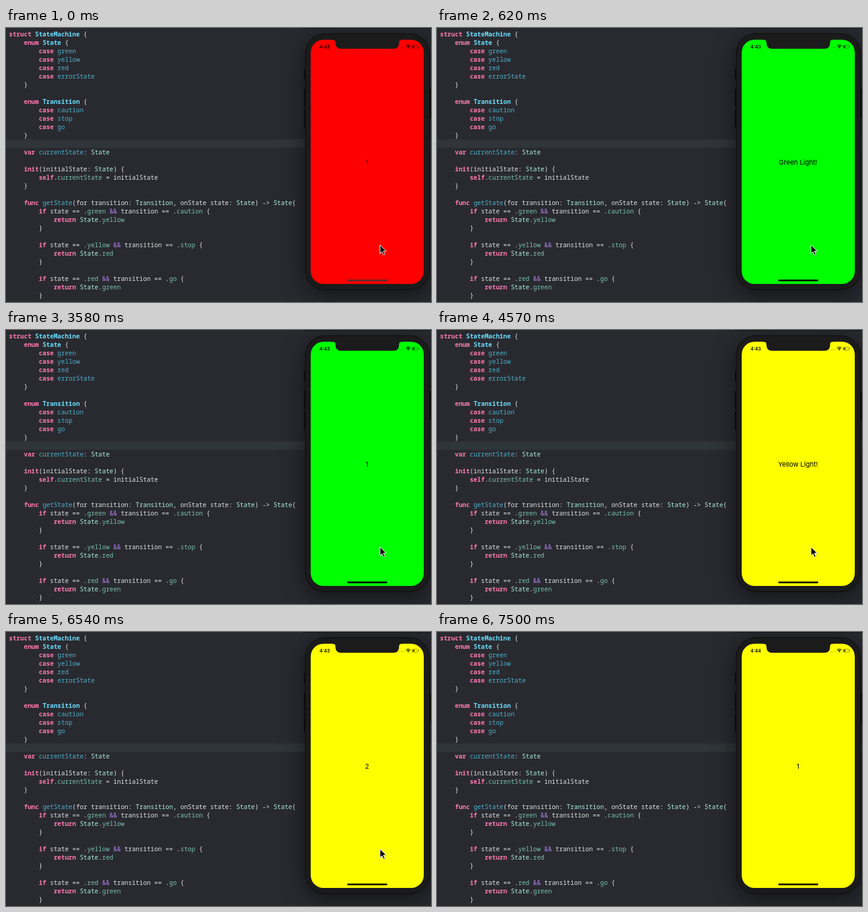
Recreate the animation shown at these times as an HTML page. Size 705 by 455 pixels, loop 8 s.

```html
<!DOCTYPE html>
<html lang="en">
<head>
<meta charset="utf-8">
<title>Traffic light state machine</title>
<style>
html, body { margin: 0; width: 100%; height: 100%; overflow: hidden; background: #292a30; }
#stage { position: relative; width: 705px; height: 455px; overflow: hidden; background: #292a30; }
#stage > * { position: absolute; }
#line { left: 0; top: 185px; width: 705px; height: 14px; background: #2f3539; }
#code { left: 5px; top: 3px; margin: 0; color: #e3e3e4; font: 500 10.3px/14px "Noto Sans Mono", "DejaVu Sans Mono", monospace; }
.key { color: #ff7ab2; font-weight: 700; }
.type { color: #6bdfff; font-weight: 600; }
.decl { color: #4eb0cc; }
.use { color: #acf2e4; }
.prop { color: #78c2b3; }
.op { color: #b281eb; }
#top { left: 493px; top: 0; width: 212px; height: 1px; background: #111214; }
#phone { left: 496px; top: 9px; width: 207px; height: 426px; box-sizing: border-box; border: 1px solid #0c0c0d; border-radius: 33px; background: #1b1b1c; box-shadow: 0 8px 36px rgba(0, 0, 0, .55); }
.button { width: 2px; background: #111113; }
svg { left: 0; top: 0; }
text { font-family: Inter, Roboto, sans-serif; }
</style>
</head>
<body>
<div id="stage">
  <div id="line"></div>
  <pre id="code"></pre>
  <div id="top"></div>
  <div class="button" style="left:494px;top:68px;height:17px"></div>
  <div class="button" style="left:494px;top:101px;height:30px"></div>
  <div class="button" style="left:494px;top:135px;height:30px"></div>
  <div class="button" style="left:703px;top:101px;height:49px"></div>
  <div id="phone"></div>
  <svg width="705" height="455" viewBox="0 0 705 455">
    <rect id="screen" x="505.5" y="19.5" width="187.5" height="405.5" rx="21"/>
    <path fill="#1b1b1c" d="M541 19H657V19.6Q652 19.6 652 24V25Q652 34.5 642.500 34.5H556Q546.500 34.5 546.500 25V24Q546.500 19.600 541 19.600Z"/>
    <text id="clock" x="520" y="33.500" font-size="7.500" font-weight="600"></text>
    <path d="M652.500 32.500H661" stroke="#000" stroke-opacity=".35" stroke-dasharray="1.300 1.100"/>
    <g fill="none" stroke="#000" stroke-width="1.200">
      <path d="M663.600 29.800Q667.200 26.700 670.800 29.800M665.100 31.500Q667.200 29.800 669.300 31.500"/>
      <path d="M666.200 32.600L667.200 33.700L668.200 32.600Z" fill="#000" stroke-width=".4"/>
    </g>
    <rect x="673.500" y="28.500" width="10" height="5" rx="1.500" fill="none" stroke="#000" stroke-opacity=".45" stroke-width=".8"/>
    <rect x="674.500" y="29.500" width="3" height="3" rx=".6" fill-opacity=".8"/>
    <path d="M684.800 30V32" stroke="#000" stroke-opacity=".45"/>
    <text id="label" x="598.800" y="226.500" font-size="11" text-anchor="middle"></text>
    <rect id="home" x="566" y="417.800" width="66.500" height="2.600" rx="1.300"/>
    <g id="cursor">
      <path d="M.4 .4V14.600L3.700 11.500L6.100 17L8.500 16L6.100 10.600H10.700Z" transform="translate(.3 .8)" fill-opacity=".25" stroke="#000" stroke-opacity=".15"/>
      <path d="M.4 .4V14.600L3.700 11.500L6.100 17L8.500 16L6.100 10.600H10.700Z" stroke="#fff" stroke-width="1"/>
    </g>
  </svg>
</div>
<script>
const $ = id => document.getElementById(id);

const source = `struct StateMachine {
    enum State {
        case green
        case yellow
        case red
        case errorState
    }

    enum Transition {
        case caution
        case stop
        case go
    }

    var currentState: State

    init(initialState: State) {
        self.currentState = initialState
    }

    func getState(for transition: Transition, onState state: State) -> State{
        if state == .green && transition == .caution {
            return State.yellow
        }

        if state == .yellow && transition == .stop {
            return State.red
        }

        if state == .red && transition == .go {
            return State.green
        }`;

// Earlier rules win.
const rules = {
  key: /\b(?:struct|enum|case|var|init|self|func|if|return)\b/,
  type: /(?<=(?:struct|enum) )\w+/,
  decl: /(?<=(?:case|var|func) )\w+/,
  prop: /(?<=\.)\w+/,
  use: /\b(?:State|Transition)\b/,
  op: /&&/
};
const syntax = new RegExp(
  Object.entries(rules).map(([name, re]) => `(?<${name}>${re.source})`).join("|"), "g");

let last = 0;
for (const m of source.matchAll(syntax)) {
  const span = document.createElement("span");
  span.className = Object.keys(rules).find(name => m.groups[name]);
  span.textContent = m[0];
  $("code").append(source.slice(last, m.index), span);
  last = m.index + m[0].length;
}
$("code").append(source.slice(last));

const LOOP = 8000;
const RED = "#ff0000", GREEN = "#00ff00", YELLOW = "#ffff00";
const steps = [
  [0, RED, "1"],
  [620, GREEN, "Green Light!"],
  [1610, GREEN, "3"],
  [2590, GREEN, "2"],
  [3580, GREEN, "1"],
  [4570, YELLOW, "Yellow Light!"],
  [5560, YELLOW, "3"],
  [6540, YELLOW, "2"],
  [7500, YELLOW, "1"]
];

const exit = { start: 6900, end: 7500, moves: 7 };

function cursorAt(t) {
  if (t < exit.start) return [620, 360];
  const k = Math.floor((t - exit.start) / (exit.end - exit.start) * exit.moves) + 1;
  const p = Math.min(1, k / exit.moves) ** 1.5;
  return [620 + 38 * p, 360 + 100 * p];
}

function draw(now) {
  const t = now % LOOP;
  const [, color, label] = steps.findLast(s => t >= s[0]);
  const red = color === RED;
  $("screen").setAttribute("fill", color);
  $("label").textContent = label;
  $("label").setAttribute("fill", red ? "#480000" : "#000");
  $("home").setAttribute("fill", red ? "#552c2c" : "#000");
  $("clock").textContent = t < exit.end ? "4:43" : "4:44";
  $("cursor").setAttribute("transform", `translate(${cursorAt(t)})`);
}

function tick() {
  draw(performance.now());
  requestAnimationFrame(tick);
}
tick();
</script>
</body>
</html>
```
